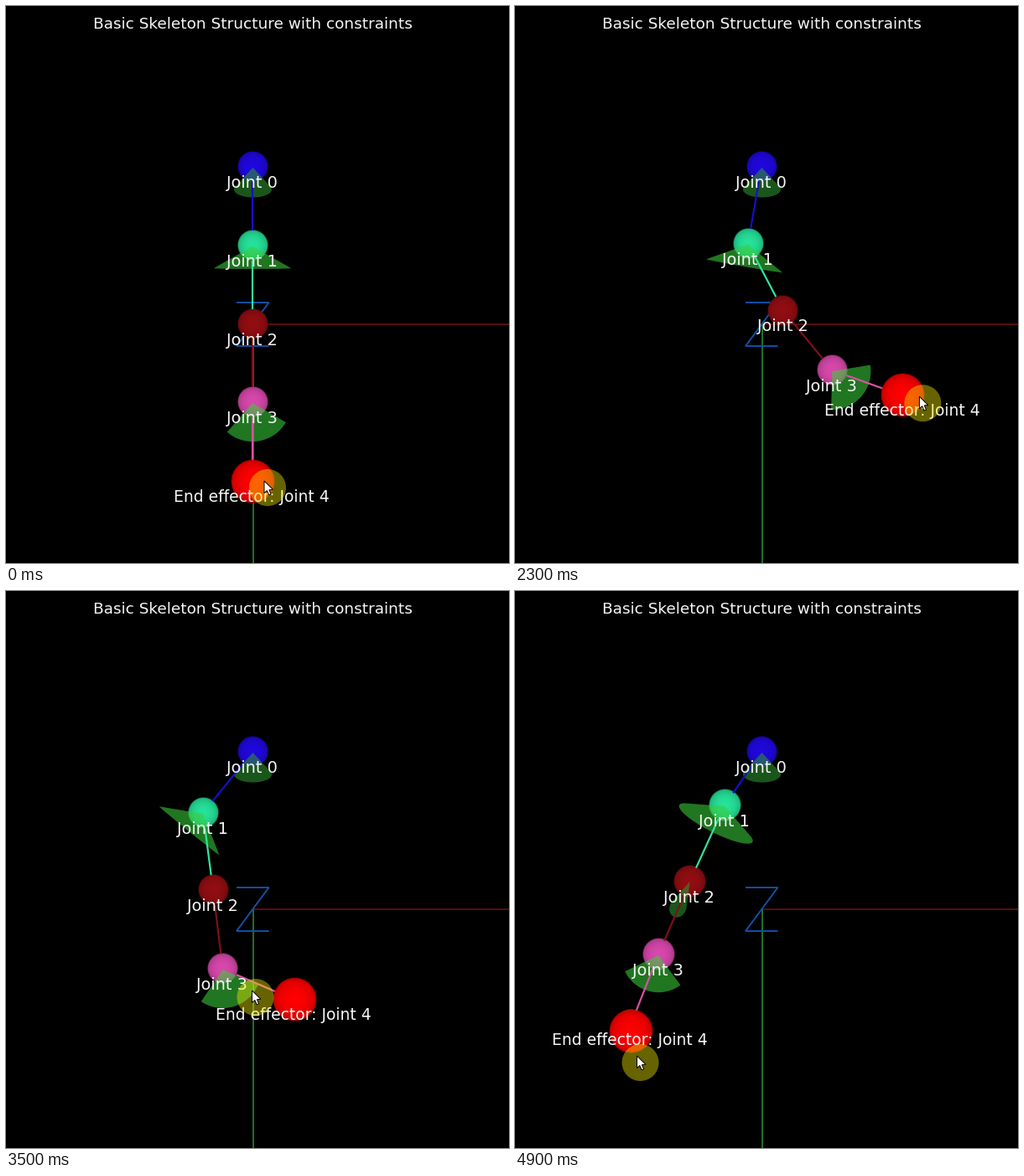
Recreate the animation shown at these times as a matplotlib script. Size 600 px wide and 665 px high, loop 5 s.

```python
import numpy as np
import matplotlib.pyplot as plt
from matplotlib.animation import FuncAnimation
from matplotlib.patches import Circle, Polygon

W, H, DPI = 600, 665, 100
STEP, FRAMES = 100, 50
ROOT = np.array([294, 192])
BALL = 18.5

# time, then x, y of joints 1, 2, 3 and the end effector
POSES = np.array([
    [0, 294, 286, 294, 380, 294, 473, 294, 568],
    [800, 294, 286, 294, 380, 294, 473, 294, 568],
    [1100, 294, 286, 292, 380, 291, 473, 307, 566],
    [1600, 293.5, 286, 288, 380, 282.5, 473, 351, 536],
    [2100, 268, 282, 290, 374, 340, 453, 425, 475],
    [2600, 293, 286, 364, 347, 436, 408, 518, 450],
    [2800, 294.5, 286, 365, 347, 436, 409, 516, 458],
    [3100, 255, 277, 318, 346, 380, 416, 449, 470],
    [3500, 235, 265, 247, 357, 258.5, 451, 344, 488],
    [4100, 250.5, 239, 186.5, 318, 148.5, 391, 194.5, 474],
    [4600, 250, 250, 200, 336, 163, 420, 160, 508],
    [4900, 250, 256, 208.5, 347, 171, 434, 138, 518],
])

# time, then x, y of the pointer halo
POINTER = np.array([
    [0, 312, 575], [100, 312, 575], [300, 306, 577], [500, 301, 578],
    [800, 300.5, 578], [1000, 310, 584], [1300, 345, 558], [1600, 390.5, 519],
    [2100, 456, 487], [2600, 532, 455], [2800, 482.5, 496], [3100, 420, 509],
    [3500, 297.5, 485], [3800, 244, 466], [4100, 209, 451],
    [4600, 160, 531], [4900, 149.5, 563],
])

# time, then offset of the red goal ball from the end effector
GAP = np.array([
    [0, 0, 0], [1100, 0, 0], [1600, 4, -2], [2100, 0, 0], [3500, 0, 0],
    [4100, 26.5, -30], [4600, 4, 0], [4900, 0.5, 8],
])

# time, then how far the chain leaves the picture plane
DEPTH = np.array([[0, 0], [3500, 0], [4100, 1], [4600, 0.75], [4900, 0.6]])


def rgb(r, g, b):
    return r / 255, g / 255, b / 255


def track(keys, t):
    return np.array([np.interp(t, keys[:, 0], col) for col in keys[:, 1:].T])


def held_time(t):
    """The picture updates unevenly, so some steps repeat the last state."""
    if t < 800:
        return max(s for s in (0, 100, 300, 500) if s <= t)
    return t - 100 if t % 500 == 200 else t


def angle(v):
    return np.arctan2(v[1], v[0])


def cone(apex, heading, h, a, b):
    """Outline of a cone whose base is an ellipse with half axes a and b."""
    s = np.arcsin(min(1, b / h))
    phi = np.linspace(-s, np.pi + s, 60)
    side, along = a * np.cos(phi), h + b * np.sin(phi)
    if b < h:
        side, along = np.append(side, 0), np.append(along, 0)
    c, n = np.cos(heading), np.sin(heading)
    return np.column_stack([apex[0] + along * c + side * n,
                            apex[1] + along * n - side * c])


def fan(apex, heading, r):
    phi = heading + np.radians(np.linspace(-60, 41, 40))
    rim = np.column_stack([apex[0] + r * np.cos(phi), apex[1] + r * np.sin(phi)])
    return np.vstack([apex, rim])


fig = plt.figure(figsize=(W / DPI, H / DPI), dpi=DPI, facecolor="black")
ax = fig.add_axes([0, 0, 1, 1])
ax.axis("off")


class Ball:
    def __init__(self, color, z):
        n = 120
        y, x = np.mgrid[-1:1:n * 1j, -1:1:n * 1j]
        d = np.hypot(x, y)
        light = 0.68 + 0.32 * np.sqrt(np.clip(1 - d ** 2, 0, 1))
        img = np.empty((n, n, 4))
        img[..., :3] = light[..., None] * np.array(color)
        img[..., 3] = np.clip((1 - d) * 22, 0, 1)
        self.im = ax.imshow(img, aspect="auto", interpolation="bilinear", zorder=z)

    def move(self, p, r):
        self.im.set_extent((p[0] - r, p[0] + r, p[1] + r, p[1] - r))


def line(xs, ys, color, width, z):
    return ax.plot(xs, ys, color=color, lw=width * 72 / DPI, zorder=z,
                   solid_capstyle="butt", solid_joinstyle="miter")[0]


def text(x, y, s, px):
    return ax.text(x, y, s, color=rgb(246, 246, 246), size=px * 72 / DPI, ha="center",
                   va="baseline", family="DejaVu Sans", zorder=8)


def shape(color, alpha, z, pts=((0, 0), (0, 0), (0, 0))):
    return ax.add_patch(Polygon(pts, closed=True, fc=color, ec="none",
                                alpha=alpha, zorder=z))


# world axes and the letter Z
line([294.5, W], [379.7, 379.7], rgb(112, 16, 16), 1.6, 1)
line([294.5, 294.5], [380, H], rgb(40, 128, 48), 1.7, 1)
line([275, 313.5, 275, 313.5], [354, 354, 406, 406], rgb(18, 82, 172), 1.9, 1)

BONE_COLORS = [rgb(24, 14, 200), rgb(48, 228, 158), rgb(126, 16, 26), rgb(214, 82, 160)]
BALL_COLORS = [rgb(32, 8, 222), rgb(38, 226, 154), rgb(146, 14, 18),
               rgb(216, 72, 172), rgb(54, 176, 8)]

bones = [line([0, 0], [0, 0], c, 2.2, 5) for c in BONE_COLORS]
balls = [Ball(c, 3) for c in BALL_COLORS]
goal = Ball(rgb(255, 0, 0), 6)

dark, bright = rgb(46, 150, 48), rgb(58, 205, 58)
shape(dark, 0.58, 4, cone((294.5, 193), np.pi / 2, 26, 22.5, 9.5))
cone1 = shape(bright, 0.58, 4)
leaf = shape(dark, 0.58, 4)
fan3 = shape(bright, 0.58, 4)

text(294, 27, "Basic Skeleton Structure with constraints", 18.5)
labels = [text(0, 0, f"Joint {i}", 19.3) for i in range(4)]
labels.append(text(0, 0, "End effector: Joint 4", 18.8))

halo = ax.add_patch(Circle((0, 0), 22, fc=rgb(250, 242, 0), ec="none",
                           alpha=0.41, zorder=9))
ring = ax.add_patch(Circle((0, 0), 8, fc="none", ec=rgb(84, 136, 150),
                           lw=1.6, zorder=10))
ARROW = np.array([[0, 0], [0, 14.6], [3.3, 11.5], [5.7, 16.8], [8.1, 15.8],
                  [5.9, 10.7], [10.4, 10.3]])
arrow = ax.add_patch(Polygon(ARROW, closed=True, fc="white", ec="black",
                             lw=0.7, zorder=11))

ax.set_xlim(0, W)
ax.set_ylim(H, 0)


def draw(i):
    t = held_time(i * STEP)
    joints = np.vstack([ROOT, track(POSES, t).reshape(4, 2)])
    depth = track(DEPTH, t)[0]
    pointer = track(POINTER, t)

    for k, (ball, p) in enumerate(zip(balls, joints)):
        ball.move(p, BALL + (1.5 * depth if k in (1, 2, 3) else 0))
        labels[k].set_position((p[0] - 0.7, p[1] + (25 if k < 4 else 24)))
    goal.move(joints[4] + track(GAP, t), 26.5)

    for k, bone in enumerate(bones):
        a, b = joints[k], joints[k + 1]
        trim = (b - a) / np.hypot(*(b - a)) * 18
        bone.set_data(*np.array([a + trim, b - trim]).T)

    turns = [angle(v) for v in np.diff(joints, axis=0)]
    cone1.set_xy(cone(joints[1] + [0, 1], turns[0] - np.radians(13 * depth),
                      26 - 5 * depth, 46 + 5 * depth, 0.9 + 17 * depth))
    leaf.set_visible(depth > 0.05)
    leaf.set_xy(cone(joints[2], turns[1], 34, 11 * min(1, 1.5 * depth), 12))
    fan3.set_xy(fan(joints[3] + [0, 1], turns[2], 46 - 3 * depth))

    tip = pointer + [-4, -8]
    halo.center = pointer
    arrow.set_xy(ARROW + tip)
    ring.center = tip + [-2.5, 0.5]
    ring.set_visible(t == 800)
    return []


anim = FuncAnimation(fig, draw, frames=FRAMES, interval=STEP, repeat=True,
                     repeat_delay=0, init_func=lambda: draw(0), blit=False)
plt.show()
```
